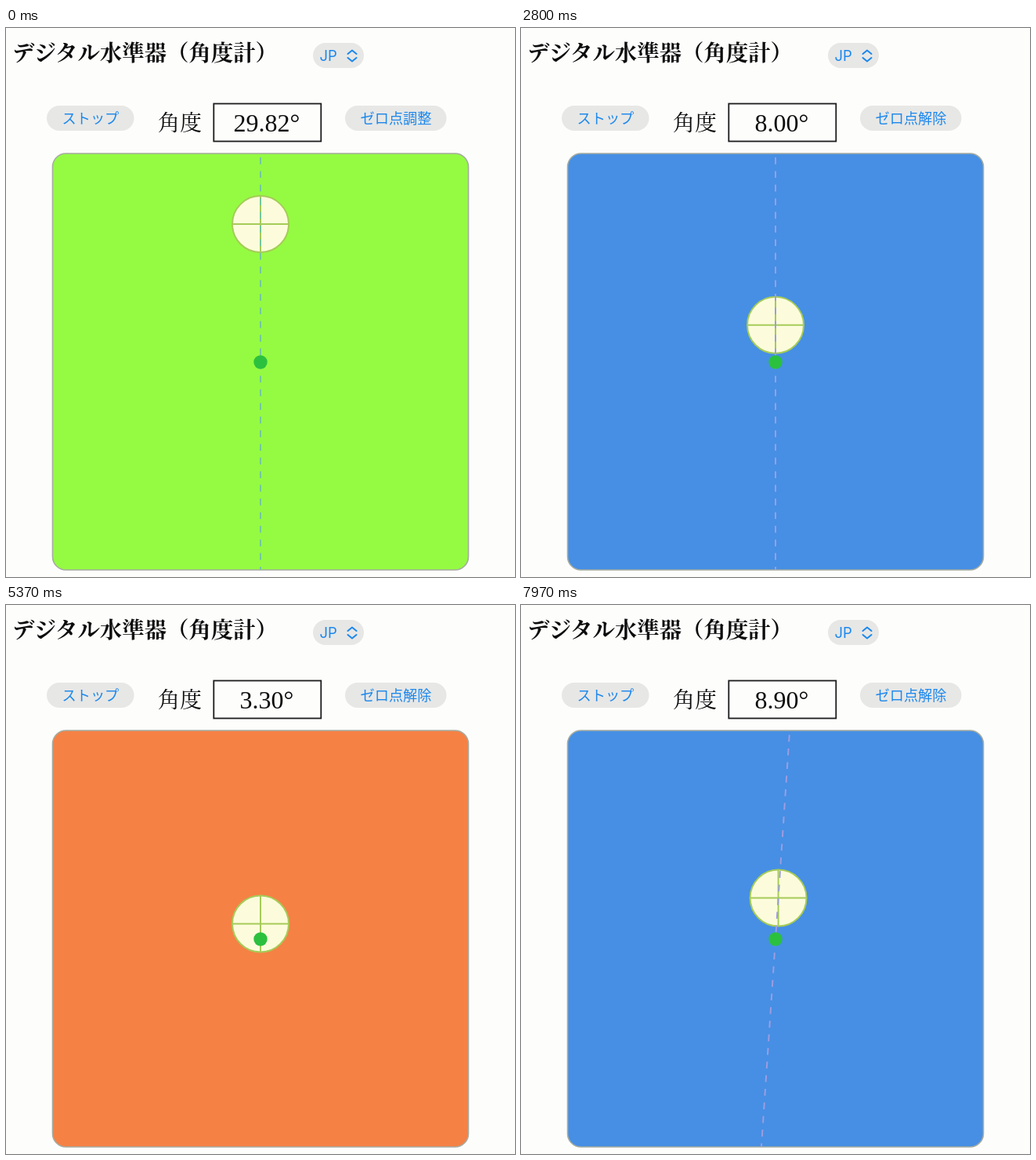
An HTML page that plays this animation: 650 by 700 pixels, repeating every 8 s.

```html
<!DOCTYPE html>
<html lang="ja">
<head>
<meta charset="utf-8">
<title>デジタル水準器</title>
<style>
  html, body { margin: 0; width: 100%; height: 100%; overflow: hidden; background: #fdfdfc; }
  svg { display: block; width: 650px; height: 700px; }
  .mincho { font-family: 'Noto Serif CJK JP', 'Noto Sans CJK JP', 'Noto Sans CJK', serif; fill: #0c0c0c; }
  .title { font-size: 28.4px; font-weight: 700; }
  .label { font-size: 28px; }
  .value { font: 32px 'Liberation Serif', serif; fill: #0c0c0c; text-anchor: middle; }
  .pill { fill: #e7e7e6; }
  .control { font: 18.2px 'Noto Sans CJK JP', 'Noto Sans CJK', sans-serif; fill: #1c88ec; }
  .lang { font: 18.5px Inter, sans-serif; fill: #1c88ec; }
  .chevron { fill: none; stroke: #1c88ec; stroke-width: 2; stroke-linecap: round; stroke-linejoin: round; }
  .ball { stroke: #a6cb58; stroke-width: 2; }
  .ball circle { fill: #fcfcdc; }
</style>
</head>
<body>
<svg viewBox="0 0 650 700">
  <defs>
    <clipPath id="panelClip"><rect x="59.5" y="160" width="531" height="531" rx="17"/></clipPath>
  </defs>

  <text class="mincho title" x="8" y="42">デジタル水準器（角度計）</text>
  <rect class="pill" x="392" y="19" width="65" height="32" rx="16"/>
  <text class="lang" x="400.5" y="42">JP</text>
  <path class="chevron" d="M436.5 33l5.5-4.5 5.5 4.5M436.5 38l5.5 4.5 5.5-4.5"/>

  <rect class="pill" x="52" y="99" width="111.5" height="32" rx="16"/>
  <text class="control" x="71.5" y="121.5">ストップ</text>
  <text class="mincho label" x="194" y="130.5">角度</text>
  <rect x="265.3" y="96.5" width="137" height="48" fill="none" stroke="#1c1c1c" stroke-width="1.8"/>
  <text class="value" id="value" x="333" y="131.5"></text>
  <rect class="pill" x="433" y="99" width="129.5" height="32" rx="16"/>
  <text class="control" id="zero" x="452.5" y="121.5"></text>

  <rect id="panel" x="59.5" y="160" width="531" height="531" rx="17" stroke="#a6aca0" stroke-width="1.6"/>
  <g class="ball" id="ball">
    <circle r="36"/>
    <path d="M-36 0H36M0-36V36"/>
  </g>
  <g clip-path="url(#panelClip)">
    <line id="axis" x1="325" y1="-270" x2="325" y2="1122" stroke-width="2" stroke-dasharray="8.7 8.7"/>
  </g>
  <circle cx="325" cy="426" r="8.7" fill="#2cc03f"/>
</svg>
<script>
  const LOOP = 8000, FPS = 30, CENTER = { x: 325, y: 426 }, PX_PER_DEGREE = 5.9, ZERO_SET = 65;
  // Key positions are counted in display refreshes of 1/FPS second.
  const angleKeys = [
    [0, 29.82], [29, 29.73], [65, 29.7], [67, 29.27], [75, 19], [84, 8], [93, 2],
    [102, 0], [116, -0.29], [132, 0.3], [161, 3.3], [189, 8.16], [239, 8.9], [240, 8.9]
  ];
  const tiltKeys = [[0, 0], [161, 0], [189, 5.1], [239, 3.9], [240, 3.9]];
  const levels = [
    { above: 10, fill: '#94fb42', axis: '#74c89c' },
    { above: 5, fill: '#468fe4', axis: '#9c9de0' },
    { above: -1, fill: '#f58145', axis: 'none' }
  ];
  const el = id => document.getElementById(id);
  const [value, zero, panel, ball, axis] = ['value', 'zero', 'panel', 'ball', 'axis'].map(el);

  function sample(keys, step) {
    const i = keys.findIndex(key => key[0] > step);
    const [s0, a] = keys[i - 1], [s1, b] = keys[i];
    return a + (b - a) * (step - s0) / (s1 - s0);
  }

  function draw(step) {
    const angle = sample(angleKeys, step), tilt = sample(tiltKeys, step);
    const level = levels.find(l => Math.abs(angle) > l.above);
    const radians = tilt * Math.PI / 180, reach = angle * PX_PER_DEGREE;
    const x = CENTER.x + reach * Math.sin(radians);
    const y = CENTER.y - reach * Math.cos(radians);
    value.textContent = angle.toFixed(2) + '°';
    zero.textContent = step < ZERO_SET ? 'ゼロ点調整' : 'ゼロ点解除';
    panel.setAttribute('fill', level.fill);
    ball.setAttribute('transform', `translate(${x} ${y})`);
    axis.setAttribute('stroke', level.axis);
    axis.setAttribute('transform', `rotate(${tilt} ${CENTER.x} ${CENTER.y})`);
  }

  const start = performance.now();
  function tick() {
    const time = (performance.now() - start) % LOOP;
    draw(Math.floor(time * FPS / 1000));
    requestAnimationFrame(tick);
  }
  tick();
</script>
</body>
</html>
```
